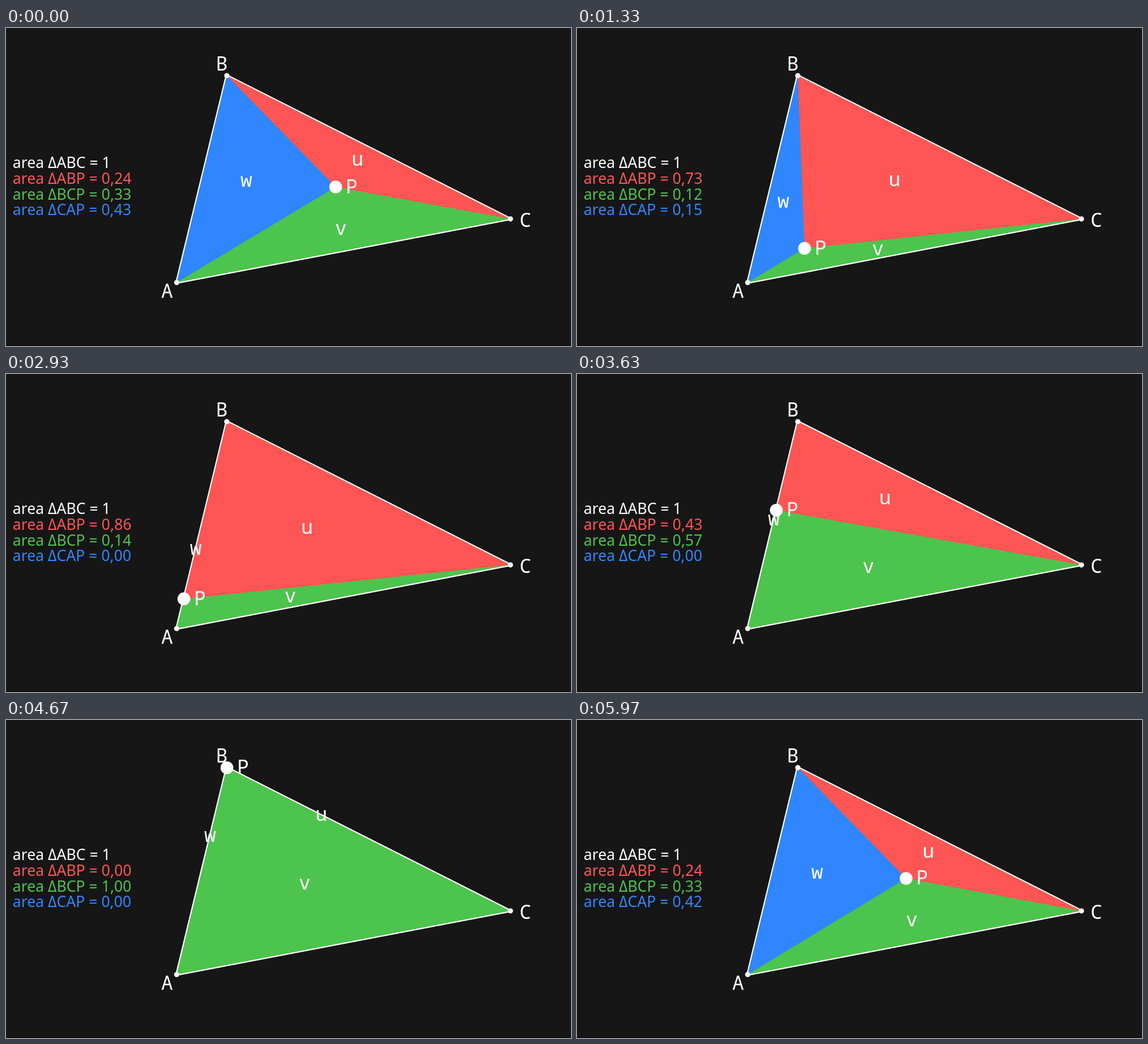
An HTML page with a canvas that plays this animation: 998 by 561 pixels, repeating every 6000 ms.

```html
<!DOCTYPE html>
<html lang="en">
<head>
<meta charset="utf-8">
<title>Barycentric coordinates</title>
<style>
  html, body { margin: 0; width: 100%; height: 100%; overflow: hidden; background: #161616; }
  canvas { display: block; }
</style>
</head>
<body>
<canvas id="stage" width="998" height="561"></canvas>
<script>
const ctx = document.getElementById('stage').getContext('2d');
const LOOP = 6000, FPS = 30;
const BG = '#161616', WHITE = '#fff', RED = '#ff5555', GREEN = '#4dc44d', BLUE = '#3086ff';
const LABEL = '35px "Fira Mono", "Noto Sans Mono", monospace';
const LIST = '26.6px "Noto Sans", sans-serif';

const A = [301.5, 449], B = [390, 84], C = [891, 336.8], HOME = [582.3, 280.5];

// Legs of the path of P: start and end step, end points, easing
const linear = s => s;
const LEGS = [
  [0, 79, HOME, A, bezier(.39, 0, .42, 1)],
  [80.97, 130, A, B, linear],
  [139, 180, B, HOME, bezier(.4, 0, .7, .96)]
];

function bezier(x1, y1, x2, y2) {
  const curve = (t, p, q) => 3 * (1 - t) ** 2 * t * p + 3 * (1 - t) * t * t * q + t ** 3;
  return s => {
    let lo = 0, hi = 1;
    for (let i = 0; i < 30; i++) {
      const mid = (lo + hi) / 2;
      if (curve(mid, x1, x2) < s) lo = mid; else hi = mid;
    }
    return s <= 0 ? 0 : s >= 1 ? 1 : curve(lo, y1, y2);
  };
}

function pointAt(step) {
  const [start, end, from, to, ease] = LEGS.filter(leg => leg[0] <= step).pop();
  const f = ease(Math.min(1, (step - start) / (end - start)));
  return from.map((v, i) => v + (to[i] - v) * f);
}

const area = (p, q, r) =>
  Math.abs((q[0] - p[0]) * (r[1] - p[1]) - (q[1] - p[1]) * (r[0] - p[0])) / 2;
const TOTAL = area(A, B, C);
const share = (p, q, r) => (area(p, q, r) / TOTAL).toFixed(2).replace('.', ',');

function trace(points) {
  ctx.beginPath();
  points.forEach(p => ctx.lineTo(...p));
  ctx.closePath();
}

function fillTriangle(color, ...points) {
  ctx.fillStyle = color;
  trace(points);
  ctx.fill();
}

function dot([x, y], r) {
  ctx.beginPath();
  ctx.arc(x, y, r, 0, 2 * Math.PI);
  ctx.fill();
}

function centerLabel(text, p, q, r) {
  ctx.fillText(text, (p[0] + q[0] + r[0]) / 3, (p[1] + q[1] + r[1]) / 3 + 9.3);
}

function draw(step) {
  const P = pointAt(step);
  ctx.fillStyle = BG;
  ctx.fillRect(0, 0, 998, 561);
  ctx.fillStyle = '#050505';
  ctx.fillRect(0, 560, 998, 1);

  // The fills cover the inner half of the outline
  ctx.strokeStyle = WHITE;
  ctx.lineWidth = 4.6;
  ctx.lineJoin = 'round';
  trace([A, B, C]);
  ctx.stroke();
  fillTriangle(GREEN, A, B, C);
  fillTriangle(RED, B, C, P);
  fillTriangle(BLUE, A, B, P);

  ctx.fillStyle = WHITE;
  [A, B, C].forEach(p => dot(p, 4.6));
  dot(P, 11.3);

  ctx.font = LABEL;
  ctx.textAlign = 'center';
  ctx.fillText('A', 284.5, 476);
  ctx.fillText('B', 381, 75);
  ctx.fillText('C', 917.5, 351);
  ctx.fillText('P', P[0] + 28.3, P[1] + 11);
  centerLabel('u', B, C, P);
  centerLabel('v', A, C, P);
  centerLabel('w', A, B, P);

  ctx.font = LIST;
  ctx.textAlign = 'left';
  [
    ['ABC', '1', WHITE],
    ['ABP', share(B, C, P), RED],
    ['BCP', share(A, C, P), GREEN],
    ['CAP', share(A, B, P), BLUE]
  ].forEach(([name, value, color], i) => {
    ctx.fillStyle = color;
    ctx.fillText(`area Δ${name} = ${value}`, 11.8, 247.3 + i * 27.7);
  });
}

function tick() {
  const time = performance.now() % LOOP;
  draw(Math.floor((time + 4) * FPS / 1000) % (LOOP * FPS / 1000));
  requestAnimationFrame(tick);
}
tick();
</script>
</body>
</html>
```
